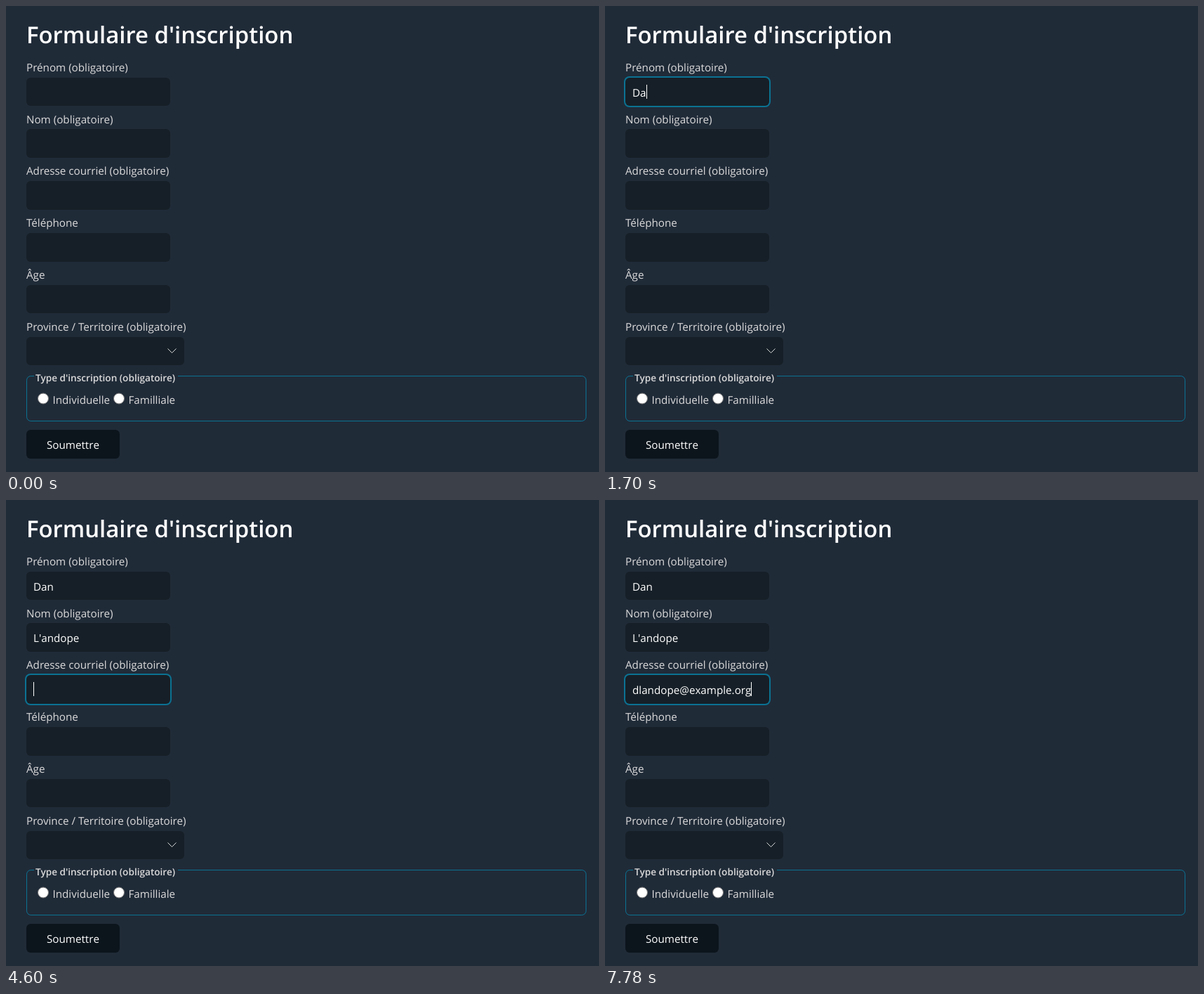
An HTML page that plays this animation: 845x663 px, repeating every 8000 ms.

```html
<!DOCTYPE html>
<html lang="fr">
<head>
<meta charset="utf-8">
<title>Formulaire d'inscription</title>
<style>
  html, body { margin: 0; width: 100%; height: 100%; overflow: hidden; background: #202b38; }
  svg { display: block; }
  text {
    font: 15.2px "Open Sans", "Noto Sans", sans-serif;
    fill: #dbdbdb;
    text-rendering: geometricPrecision;
    white-space: pre;
  }
  .bright { fill: #fff; font-kerning: none; }
  .title { font-size: 32.9px; font-weight: 600; fill: #fff; }
  .legend { font-size: 13.6px; font-weight: 600; }
</style>
</head>
<body>
<svg id="stage" width="845" height="663" viewBox="0 0 845 663"></svg>
<script>
const LOOP = 8000, PITCH = 73.8, LEFT = 29, WIDTH = 205;
const BOX = "#161f27", FOCUS = "#0096bf";
const stage = document.getElementById("stage");

function add(tag, attrs, content) {
  const el = document.createElementNS("http://www.w3.org/2000/svg", tag);
  set(el, attrs);
  if (content) el.textContent = content;
  return stage.appendChild(el);
}
function set(el, attrs) {
  for (const key in attrs) el.setAttribute(key, attrs[key]);
  return el;
}
const label = (x, y, content, cls = "") => add("text", { x, y, class: cls }, content);
const box = (x, y, width, height, fill) => add("rect", { x, y, width, height, rx: 6, fill });
const show = (el, on) => set(el, { visibility: on ? "visible" : "hidden" });

// Static form
label(LEFT, 53, "Formulaire d'inscription", "title");
const fields = ["Prénom (obligatoire)", "Nom (obligatoire)", "Adresse courriel (obligatoire)", "Téléphone", "Âge"]
  .map((name, i) => {
    const top = 101.6 + PITCH * i;
    const y = Math.round(top), height = Math.round(top + 40.6) - y;
    label(LEFT, top - 8.8, name);
    const ring = add("rect", { fill: FOCUS });
    box(LEFT, y, WIDTH, height, BOX);
    return { y, height, ring, value: label(39, top + 27, "", "bright") };
  });

label(LEFT, 461.8, "Province / Territoire (obligatoire)");
box(LEFT, 471, 225, 40, BOX);
add("path", { d: "M230.5 487.5l6 6 6-6", fill: "none", stroke: "#efefef", "stroke-width": .9 });

add("path", {
  d: "M40 526.5H35.5a6 6 0 0 0-6 6V584.5a6 6 0 0 0 6 6H820.5a6 6 0 0 0 6-6V532.5a6 6 0 0 0-6-6H245",
  fill: "none", stroke: FOCUS, "stroke-opacity": .67
});
label(42, 533.5, "Type d'inscription (obligatoire)", "legend");
[[53, "Individuelle"], [161, "Familliale"]].forEach(([cx, name]) => {
  add("circle", { cx, cy: 558.5, r: 7.5, fill: "#fff", stroke: "#767676" });
  label(cx + 13.5, 565.5, name);
});
box(LEFT, 603, 133, 41, "#0c151c");
set(label(95.5, 630, "Soumettre", "bright"), { "text-anchor": "middle" });

const caret = add("rect", { width: 1, height: 20, fill: "#fff" });
const arrow = add("path", { d: "M0 0V16.5L3.8 13 6.2 18.5 8.6 17.5 6.2 12H11.5Z", fill: "#fff", stroke: "#000", "stroke-width": .8 });
const beam = add("path", { d: "M-3.5-7.5H-1Q0-7.5 0-6.5V6.5Q0 7.5-1 7.5H-3.5M3.5-7.5H1Q0-7.5 0-6.5M0 6.5Q0 7.5 1 7.5H3.5", fill: "none", stroke: "#e8e8e8" });

// Focus times per field, and typing as [time, characters shown]
const focus = [1030, 2250, 4470, Infinity];
const typing = [
  ["Dan", [[1500, 1], [1700, 2], [1880, 3]]],
  ["L'andope", [[2510, 1], [2710, 2], [2890, 3], [3060, 4], [3240, 6], [4110, 7], [4290, 8]]],
  ["dlandope@example.org", [
    [4800, 1], [4920, 2], [5160, 4], [5390, 5], [5590, 6], [5690, 7], [5790, 8],
    [6050, 9], [6300, 10], [6520, 11], [6660, 12], [6790, 13], [6920, 14],
    [7130, 15], [7290, 16], [7450, 17], [7610, 19], [7780, 20]]]
];

const clamp = v => Math.max(0, Math.min(1, v));
const ease = u => u * u * (3 - 2 * u);
const mix = (a, b, u) => a + (b - a) * u;
// Two-step fade of the focus ring
const ramp = (t, start) => t < start ? 0 : t < start + 70 ? .5 : 1;

function pointerAt(t) {
  if (t < 200 || t >= 1500) return null;
  if (t < 1100) {
    const step = Math.floor((t - 200) / 75) * 75;
    const u = ease(clamp((step + 75) / 750));
    return [mix(811, 132, u), mix(547, 124.5, u)];
  }
  const u = t < 1165 ? 0 : t < 1230 ? .5 : 1;
  return [mix(132, 811, u), mix(124.5, 185, u)];
}

function drawPointer(t) {
  const p = pointerAt(t);
  const inField = p && p[0] > LEFT && p[0] < LEFT + WIDTH &&
    fields.some(f => p[1] > f.y && p[1] < f.y + f.height);
  show(arrow, p && !inField);
  show(beam, inField);
  if (p) set(inField ? beam : arrow, { transform: `translate(${p[0]} ${p[1]})` });
}

function draw(t) {
  typing.forEach(([word, keys], i) => {
    const { y, height, ring, value } = fields[i];
    const k = ramp(t, focus[i]) - ramp(t, focus[i + 1]);
    const out = 2 * k;
    set(ring, {
      x: LEFT - out, y: y - out, width: WIDTH + 2 * out, height: height + 2 * out,
      rx: 6 + out, "fill-opacity": .67 * Math.sqrt(k)
    });
    const count = keys.reduce((n, [at, chars]) => t >= at ? chars : n, 0);
    const shown = word.slice(0, count);
    if (value.textContent !== shown) value.textContent = shown;
  });

  const active = focus.filter(at => t >= at).length - 1;
  show(caret, active >= 0 && !(t >= 3790 && t < 4060));
  if (active >= 0) {
    const { y, value } = fields[active];
    const width = value.textContent ? value.getComputedTextLength() : 0;
    set(caret, { x: Math.round(39 + width), y: y + 10 });
  }
  drawPointer(t);
}

const start = performance.now();
function tick() {
  draw((performance.now() - start) % LOOP);
  requestAnimationFrame(tick);
}
tick();
</script>
</body>
</html>
```
